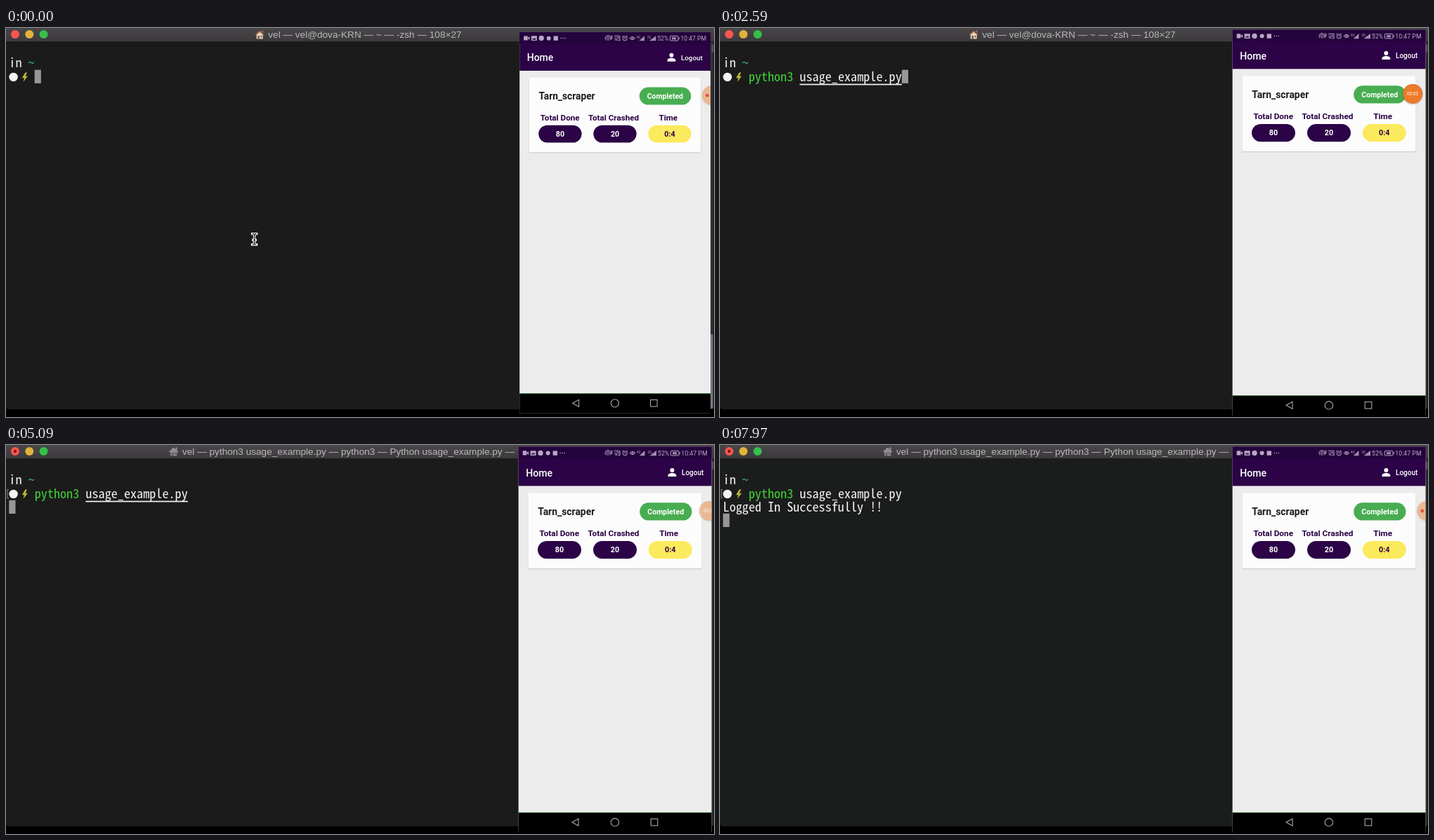
Write an HTML page that moves like this. It is 1008 px wide and 555 px high and loops after 8 s.

```html
<!DOCTYPE html>
<html lang="en">
<head>
<meta charset="utf-8">
<title>Terminal and phone</title>
<style>
html, body { margin: 0; width: 100%; height: 100%; overflow: hidden; background: #000; }
svg { display: block; width: 100vw; height: 100vh; }
.title { font: 13.6px "Liberation Sans", Arial, sans-serif; fill: #b9b7b9; }
.term { font-family: "Noto Sans Mono CJK JP", "Noto Sans Mono CJK SC", "Noto Sans Mono", monospace; fill: #f4f4f4; white-space: pre; }
.phone { font-family: Roboto, sans-serif; }
.bold { font-weight: 700; }
.med { font-weight: 500; }
.mid { text-anchor: middle; }
</style>
</head>
<body>
<svg viewBox="0 0 1008 555" preserveAspectRatio="none">
  <defs>
    <linearGradient id="bar" x2="0" y2="1">
      <stop offset="0" stop-color="#494749"/><stop offset="1" stop-color="#3b393b"/>
    </linearGradient>
    <radialGradient id="orange">
      <stop offset="0" stop-color="#f07c28"/><stop offset=".85" stop-color="#ec7a2b"/><stop offset="1" stop-color="#d9762f"/>
    </radialGradient>
    <clipPath id="screen"><rect x="729.6" y="2.5" width="275" height="550.5"/></clipPath>
    <path id="ibeam" d="M350.6 293.6H352.2L353.6 294.8L355 293.6H356.6M353.6 295V307.5M350.6 309H352.2L353.6 307.8L355 309H356.6M352 302.5H355.2"/>
  </defs>

  <rect width="1008" height="555" fill="#000"/>
  <path id="back" d="M0 0H1008V540Q1008 544 1004 544H4Q0 544 0 540Z" fill="#1b1b1b"/>
  <rect width="1008" height="20" fill="url(#bar)"/>
  <rect y="19.4" width="1008" height=".8" fill="#111"/>
  <rect x="1002.5" y="20" width="4" height="523" fill="#343436"/>
  <rect x="1004.5" y="23" width="3" height="12" rx="1.5" fill="#555"/>
  <rect id="thumb" x="1002.5" y="437" width="4" height="106" rx="1.5" fill="#77777d"/>
  <circle cx="13" cy="9" r="6" fill="#fb5550"/>
  <circle id="busyDot" cx="13" cy="9" r="2" fill="#6b0d0b"/>
  <circle cx="33.3" cy="9" r="6" fill="#e2b33a"/>
  <circle cx="53.6" cy="9" r="6" fill="#35c14a"/>

  <g id="house">
    <path id="walls" d="M-4.5 -1V6H4.5V-1L0 -5Z"/>
    <path id="roof" d="M-6.5 0L0 -6L6.5 0L5.5 1.2L0 -3.8L-5.5 1.2ZM3 -6H5V-2L3 -4Z"/>
    <path id="door" d="M-2.8 1.5H-.3V6H-2.8ZM1 1.5H3.2V3.8H1Z"/>
  </g>
  <text id="title" class="title" y="14"></text>

  <g id="term" class="term">
    <text x="4.3" y="56">in <tspan fill="#42b7a9">~</tspan></text>
    <path id="mark" d="M4 63.5H2V76H4" fill="none" stroke="#777" stroke-width="1.2"/>
    <circle cx="10.6" cy="70" r="6.2" fill="#f4f4f4"/>
    <path d="M27.5 63.5L22.8 71.2H26L24.6 77L30.8 68.8H27.6L30 63.5Z" fill="#b9b83c"/>
    <text id="cmd" x="40.7" y="75.8"></text>
    <text id="arg" x="113.4" y="75.8"></text>
    <rect id="line" x="113.4" y="79.7" height="1.7" fill="#f4f4f4"/>
    <text id="out" x="4.3" y="94.8">Logged In Successfully !!</text>
  </g>
  <rect id="caret" width="9.2" height="19.2" fill="#979797"/>

  <g id="beam" fill="none">
    <use href="#ibeam" stroke="#fff" stroke-width="3.4" stroke-linecap="square"/>
    <use href="#ibeam" stroke="#111" stroke-width="1.2"/>
  </g>

  <g id="phone" class="phone">
    <g clip-path="url(#screen)">
      <rect x="729" y="2" width="276" height="551" fill="#ececec"/>
      <rect x="729" y="2" width="276" height="56.4" fill="#2b0346"/>
      <rect x="729" y="2" width="276" height="17.5" fill="#25033d"/>
      <rect x="729" y="524.4" width="276" height="29" fill="#000"/>
      <rect x="729" y="524" width="276" height=".8" fill="#2f7a41"/>

      <g fill="#b7a7c4" stroke="none">
        <path d="M735.7 8.3H741.3V14.5H735.7ZM741.5 11L744 9V14L741.5 12Z"/>
        <path d="M746.6 8.2H754.6V15H746.6ZM747.8 13.6H753.4L751.5 11L750 12.4L749 11.6Z" fill-rule="evenodd"/>
        <circle cx="761" cy="11.4" r="3.7"/>
        <circle cx="771.6" cy="11.6" r="3"/>
        <rect x="778.6" y="8.4" width="6.4" height="6.4"/>
        <circle cx="789.3" cy="11.5" r=".8"/><circle cx="792.3" cy="11.5" r=".8"/><circle cx="795.3" cy="11.5" r=".8"/>
        <path d="M901.8 15.2L909.5 8V15.2ZM916.5 15.2L926 8V15.2Z" opacity=".85"/>
        <rect x="949" y="10" width="6" height="3.4" opacity=".8"/>
        <rect x="958.6" y="10.2" width="1.1" height="3"/>
        <text x="898" y="11.5" font-size="4.5">4G</text>
        <text x="913.6" y="11.5" font-size="4.5">2G</text>
        <text x="928" y="14.9" font-size="8.7">52%</text>
        <text x="998.6" y="14.9" font-size="8.8" text-anchor="end">10:47 PM</text>
      </g>
      <g fill="none" stroke="#b7a7c4" stroke-width="1">
        <path d="M854.5 14.7A4 4 0 1 1 859.5 14.7M855.7 12.8A2 2 0 1 1 858.3 12.8M857 11.5V15M861 8.4H863V11H861.3V12.5H863"/>
        <path d="M866.5 9V8.3H874V14.8H871.5M866.5 11A4 4 0 0 1 870 15M866.5 13A2 2 0 0 1 868.3 15M869.5 10.5H872V13"/>
        <circle cx="881.3" cy="11.9" r="3.1"/>
        <path d="M881.3 10V12L882.5 13M877.6 9.2L879.3 7.8M885 9.2L883.3 7.8"/>
        <path d="M888 11.5Q892 7.5 896 11.5Q892 15.5 888 11.5Z"/><circle cx="892" cy="11.6" r="1.3"/>
        <rect x="946.4" y="8.4" width="11.6" height="6.6" rx=".8"/>
      </g>

      <g fill="#fff" class="med">
        <text x="740.3" y="44.6" font-size="14.1">Home</text>
        <text x="962" y="42.8" font-size="10">Logout</text>
        <circle cx="948.4" cy="36" r="3"/>
        <path d="M942.5 45V43.4C942.5 41 946 40 948.4 40S954.3 41 954.3 43.4V45Z"/>
      </g>

      <rect x="742.9" y="69" width="248.2" height="108.2" rx="2.5" fill="#cfcfd0"/>
      <rect x="743.4" y="68.4" width="247.2" height="107.6" rx="2" fill="#fcfcfc"/>
      <text class="bold" x="757.2" y="100.4" font-size="13.9" fill="#1d1d1d">Tarn_scraper</text>
      <g id="card" class="bold mid">
        <rect x="902.2" y="82.2" width="74.3" height="25.4" rx="12.7" fill="#48ad51"/>
        <text x="939.2" y="98.7" font-size="10.6" fill="#fff">Completed</text>
      </g>

      <g fill="none" stroke="#a9a9a9" stroke-width="1.1">
        <path d="M815 533.3V543.3L806 538.3Z"/>
        <circle cx="866.9" cy="538.3" r="5.7"/>
        <rect x="918.2" y="533.4" width="9.6" height="9.6"/>
      </g>

      <g id="button">
        <circle r="15" cy=".8" fill="#000" opacity=".12"/>
        <circle r="14" fill="url(#orange)"/>
        <text id="clock" class="mid" y="2.4" font-size="6.6" fill="#fff"></text>
      </g>
      <circle id="rec" cx="999.8" cy="94" r="2.5" fill="#e2574b"/>
    </g>
  </g>
</svg>

<script>
const LOOP = 8000, COL = 9.09, LEFT = 4.3;
const RUN = 2850, DONE = 7400;
const PROGRAM = "python3", FILE = "usage_example.py";
const TITLES = [
  "vel — vel@dova-KRN — ~ — -zsh — 108×27",
  "vel — python3 usage_example.py — python3 — Python usage_example.py — 108×27"
];

const $ = id => document.getElementById(id);
const set = (id, attrs) => {
  for (const k in attrs) $(id).setAttribute(k, attrs[k]);
};
const show = (id, on) => set(id, { visibility: on ? "visible" : "hidden" });
const clamp = x => Math.max(0, Math.min(1, x));
const ease = (t, from, to) => {
  const p = clamp((t - from) / (to - from));
  return p * p * (3 - 2 * p);
};
const mix = (a, b, p) => a + (b - a) * p;

// Choose the font size whose character advance is one column.
function fitColumns() {
  set("term", { "font-size": 100 });
  const text = $("out");
  const advance = text.getComputedTextLength() / text.textContent.length;
  set("term", { "font-size": 100 * COL / advance });
}
fitColumns();

function addStat(x, label, labelX, value, fill, ink) {
  $("card").insertAdjacentHTML("beforeend",
    `<text x="${labelX}" y="130.2" font-size="11.8" fill="#2b0346">${label}</text>
     <rect x="${x}" y="137" width="62" height="25.2" rx="12.6" fill="${fill}"/>
     <text x="${x + 31}" y="153.4" font-size="10.8" fill="${ink}">${value}</text>`);
}
addStat(757, "Total Done", 787.8, "80", "#2b0346", "#fff");
addStat(836, "Total Crashed", 865, "20", "#2b0346", "#fff");
addStat(914.8, "Time", 943.7, "0:4", "#fbea5d", "#2b0346");

// Number of typed characters; the file name ends with a completion.
function typed(t) {
  if (t < 900) return 0;
  if (t < 1800) return Math.min(7, 1 + Math.floor((t - 900) / 115));
  if (t < 2400) return Math.min(11, 8 + Math.floor((t - 1800) / 130));
  return PROGRAM.length + 1 + FILE.length;
}

function drawTerminal(t) {
  const n = typed(t), running = t >= RUN, done = t >= DONE;
  const path = FILE.slice(0, Math.max(0, n - 8));
  $("cmd").textContent = PROGRAM.slice(0, n);
  set("cmd", { fill: n < 6 ? "#dc4b43" : "#3fd136" });
  $("arg").textContent = path;
  set("line", { width: done ? 0 : path.length * COL });
  show("out", done);
  set("back", { fill: done ? "#1b1d1c" : "#1b1b1b" });
  set("caret", {
    x: running ? LEFT : LEFT + (4 + n) * COL,
    y: done ? 97.8 : running ? 78.8 : 59.7
  });
  show("mark", running);
  show("busyDot", running);

  $("title").textContent = TITLES[+running];
  set("title", { x: running ? 251 : 373.3 });
  set("house", { transform: `translate(${running ? 238.7 : 361.2} 9.5)` });
  set("walls", { fill: running ? "#8b898b" : "#e3d6c4" });
  set("roof", { fill: running ? "#9a989a" : "#a9644b" });
  set("door", { fill: running ? "#5d5b5d" : "#7c5a45" });
  show("beam", t < 300);
  set("thumb", { opacity: 1 - ease(t, 0, 400) });
}

function drawPhone(t) {
  const scale = mix(0.9885, 1, ease(t, 0, 300));
  set("phone", { transform: `translate(866.9 280) scale(${scale}) translate(-866.9 -280)` });

  const out = ease(t, 2600, 2900), away = ease(t, 5700, 5900);
  const lit = ease(t, 60, 300) * (1 - out);
  const x = t < 1000 ? mix(1006.5, 986.3, lit) : mix(986.3, 1001, out) + 5.5 * away;
  set("button", { transform: `translate(${x} 94)`, opacity: mix(0.45, 1, lit) });

  const counting = t >= 1000 && t < 5800;
  $("clock").textContent = counting ? "00:0" + Math.floor(t / 1000) : "";
  set("rec", { opacity: t < 1000 ? 1 - lit : away });
}

function frame() {
  const t = performance.now() % LOOP;
  drawTerminal(t);
  drawPhone(t);
  requestAnimationFrame(frame);
}
frame();
</script>
</body>
</html>
```
